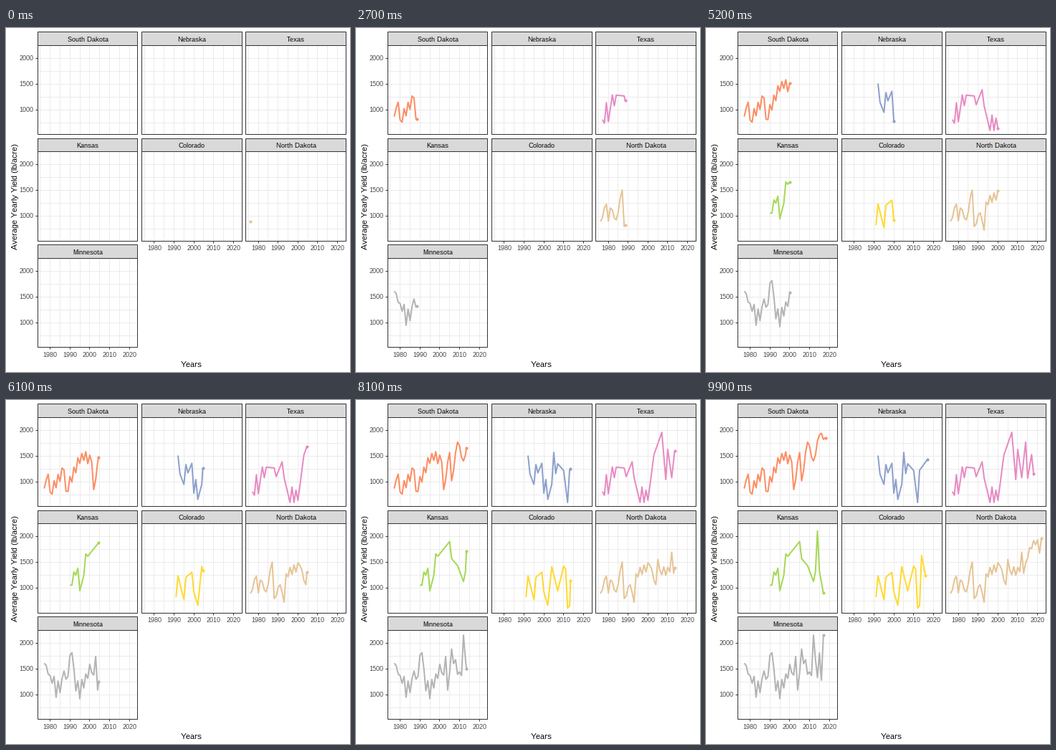
These frames come from a looping animation (480x480 px, 10000 ms). A matplotlib script:

```python
import numpy as np
import matplotlib.pyplot as plt
from matplotlib.animation import FuncAnimation
from matplotlib.patches import Rectangle

plt.rcParams.update({
    "font.family": "Liberation Sans",
    "text.hinting": "default",
    "text.hinting_factor": 1,
    "text.kerning_factor": 6,
})

SIZE, FRAMES, INTERVAL = 480, 100, 100
FIRST, LAST = 1976, 2022
LEFT, TOP, GAP, STRIP_H = 44.19, 5.5, 5.5, 18.9
WIDTH, HEIGHT = 139.77, 124.1
STEP_X, STEP_Y = WIDTH + GAP, HEIGHT + STRIP_H + GAP
PX_YEAR, PX_LB = WIDTH / (1.1 * (LAST - FIRST)), 0.072
INK, GRID, STRIP = "#333333", "#EBEBEB", "#D9D9D9"

# name, colour, swing between even and odd years, turning points
STATES = [
    ("South Dakota", "#FC8D62", 25, {
        1977: 870, 1979: 1150, 1980: 800, 1987: 1230, 1988: 820, 1996: 1550,
        2001: 1385, 2002: 850, 2005: 1570, 2006: 1020, 2009: 1770,
        2012: 1405, 2015: 1910, 2018: 1855}),
    ("Nebraska", "#8DA0CB", 0, {
        1992: 1510, 1993: 1150, 1995: 950, 1996: 1335, 1997: 1175, 1999: 1360,
        2000: 780, 2001: 1045, 2002: 660, 2004: 950, 2005: 1570, 2006: 1160,
        2007: 1350, 2010: 1220, 2012: 600, 2013: 1225, 2017: 1435}),
    ("Texas", "#E78AC3", 0, {
        1977: 810, 1978: 740, 1979: 1140, 1980: 770, 1982: 1290, 1983: 1080,
        1984: 1285, 1988: 1270, 1989: 1100, 1992: 1390, 1993: 1080,
        1996: 600, 1997: 900, 1998: 600, 1999: 840, 2000: 640, 2003: 1520,
        2007: 1960, 2009: 1045, 2010: 1630, 2012: 1080, 2014: 1770,
        2015: 1070, 2017: 1530, 2018: 1160}),
    ("Kansas", "#A6D854", 0, {
        1990: 1060, 1991: 1060, 1992: 1315, 1993: 1255, 1994: 1390, 1995: 950,
        1997: 1250, 1998: 1665, 1999: 1620, 2005: 1905, 2006: 1575,
        2009: 1440, 2012: 1130, 2013: 1320, 2014: 2110, 2015: 1330,
        2017: 910}),
    ("Colorado", "#FFD92F", 0, {
        1991: 830, 1992: 1240, 1995: 780, 1996: 1215, 1999: 1310, 2000: 930,
        2002: 670, 2004: 1420, 2007: 950, 2010: 1430, 2011: 1370, 2012: 615,
        2013: 660, 2014: 1635, 2016: 1250}),
    ("North Dakota", "#E5C494", 20, {
        1976: 900, 1979: 1235, 1980: 910, 1981: 1160, 1984: 930, 1987: 1510,
        1988: 800, 1991: 1070, 1993: 730, 1994: 1280, 2001: 1440, 2004: 1070,
        2005: 1560, 2006: 1350, 2011: 1320, 2012: 1700, 2013: 1290,
        2016: 1790, 2020: 1940, 2021: 1680, 2022: 1970}),
    ("Minnesota", "#B3B3B3", 60, {
        1977: 1610, 1979: 1400, 1981: 1220, 1985: 1040, 1987: 1460,
        1988: 1300, 1991: 1815, 1993: 1075, 1997: 1130, 2000: 1590,
        2002: 1380, 2003: 1740, 2004: 1090, 2006: 1885, 2009: 1395,
        2011: 1370, 2012: 2155, 2014: 1330, 2015: 1810, 2016: 1280,
        2017: 2160}),
]

fig = plt.figure(figsize=(SIZE / 72, SIZE / 72), dpi=72, facecolor="white")
ax = fig.add_axes([0, 0, 1, 1])
ax.set_axis_off()
ax.set_xlim(0, SIZE)
ax.set_ylim(SIZE, 0)


def x_of(year, col):
    return LEFT + STEP_X * col + (year - FIRST + 2.3) * PX_YEAR


def y_of(value, row):
    return 114.2 + STEP_Y * row - (value - 1000) * PX_LB


def snap(v):
    """A position that lands on the centre of its own pixel."""
    return np.floor(v) + 0.3


def rule(x0, y0, x1, y1, color, z):
    ax.plot(snap([x0, x1]), snap([y0, y1]), color=color, lw=1,
            solid_capstyle="butt", zorder=z)


def box(x0, y0, x1, y1, fill, z):
    x0, y0, x1, y1 = snap([x0, y0, x1, y1])
    ax.add_patch(Rectangle((x0, y0), x1 - x0, y1 - y0, fc=fill, ec=INK, lw=1,
                           zorder=z))


def label(x, y, text, size=9, color="#404040", ha="center", angle=0):
    ax.text(x, y, text, size=size, color=color, ha=ha, va="baseline",
            rotation=angle, rotation_mode="anchor", zorder=6)


def panel(name, row, col):
    left, strip = LEFT + STEP_X * col, TOP + STEP_Y * row
    right, top = left + WIDTH, strip + STRIP_H
    bottom = top + HEIGHT
    for year in range(1975, 2021, 5):
        x = x_of(year, col)
        rule(x, top, x, bottom, GRID, 1)
    for value in range(750, 2001, 250):
        y = y_of(value, row)
        rule(left, y, right, y, GRID, 1)
    box(left, top, right, bottom, "none", 4)
    box(left, strip, right, top, STRIP, 5)
    label((left + right) / 2, top - 5.6, name, color="black")

    if col == 0:
        for value in (1000, 1500, 2000):
            y = y_of(value, row)
            rule(left - 3, y, left, y, INK, 3)
            label(left - 6, np.floor(y) + 2.6, str(value), ha="right")
    if row == 2 or (row == 1 and col > 0):
        for year in range(1980, 2021, 10):
            x = x_of(year, col)
            rule(x, bottom, x, bottom + 3, INK, 3)
            label(x, bottom + 13.5, str(year))


def yields(points, swing):
    """Yearly values: straight between turning points, plus a zigzag that
    grows with the distance between them."""
    keys = np.array(list(points))
    years = np.arange(keys[0], keys[-1] + 1)
    values = np.interp(years, keys, list(points.values()))
    for a, b in zip(keys, keys[1:]):
        inner = (years > a) & (years < b)
        sign = np.where(years[inner] % 2, -1, 1)
        values[inner] += sign * swing * (min(b - a, 5) - 1)
    return years, values


class Series:
    def __init__(self, color, swing, points, row, col):
        years, values = yields(points, swing)
        # each year becomes visible on a whole frame
        self.keys = np.round((years - FIRST) / (LAST - FIRST) * (FRAMES - 1))
        self.x, self.y = x_of(years, col), y_of(values, row)
        self.line, = ax.plot([], [], color=color, lw=2, zorder=2,
                             solid_capstyle="butt", solid_joinstyle="round")
        self.dot, = ax.plot([], [], "o", color=color, ms=4.2, mew=0, zorder=3)

    def show(self, frame):
        if frame < self.keys[0]:
            self.line.set_data([], [])
            self.dot.set_data([], [])
            return
        n = np.searchsorted(self.keys, frame, side="right")
        hx = np.interp(frame, self.keys, self.x)
        hy = np.interp(frame, self.keys, self.y)
        self.line.set_data(np.append(self.x[:n], hx), np.append(self.y[:n], hy))
        self.dot.set_data([hx], [hy])


series = []
for i, (name, color, swing, points) in enumerate(STATES):
    row, col = divmod(i, 3)
    panel(name, row, col)
    series.append(Series(color, swing, points, row, col))

label(259, 472.6, "Years", size=11, color="black")
label(15.6, 235, "Average Yearly Yield (lb/acre)", size=11, color="black",
      angle=90)


def update(frame):
    for s in series:
        s.show(frame)
    return []


anim = FuncAnimation(fig, update, frames=FRAMES, interval=INTERVAL,
                     init_func=lambda: update(0), repeat=True, repeat_delay=0)
plt.show()
```
